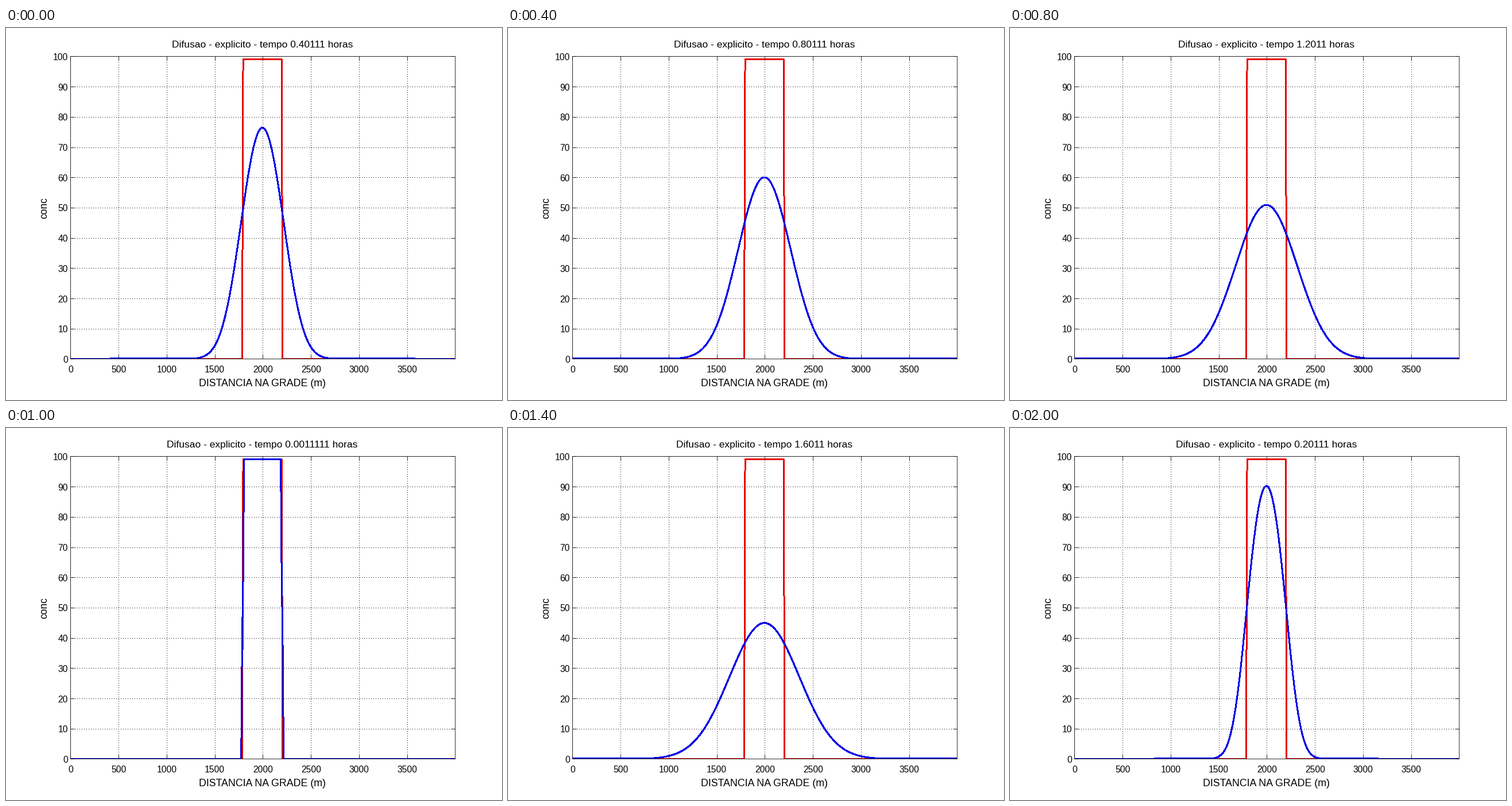
Animation of 864x648 px, one loop 2.2 s. Source, as a matplotlib script:

```python
import numpy as np
import matplotlib.pyplot as plt
from matplotlib.animation import FuncAnimation

W, H = 864, 648
# just under half a pixel, so snapped lines do not round up
LEFT, RIGHT, TOP, BOTTOM = 112.49, 782.49, 49.49, 576.49
X_MAX = 4000

# explicit diffusion: D = 10 m2/s, dx = 10 m, dt = 4 s
CELLS, DT, R = 400, 4, 10 * 4 / 10**2
HOURS = [0.4, 0.6, 0.8, 1.0, 1.2, 0.0, 1.4, 1.6, 1.8, 2.0, 0.2]

plt.rcParams["font.family"] = "Liberation Sans"
fig = plt.figure(figsize=(W / 72, H / 72), dpi=72, facecolor="white")
ax = fig.add_axes([LEFT / W, 1 - BOTTOM / H,
                   (RIGHT - LEFT) / W, (BOTTOM - TOP) / H])


def label(x, y, text, size, ha="center", **kw):
    return fig.text(x / W, 1 - y / H, text, fontsize=size, ha=ha,
                    va="baseline", color="black", **kw)


def diffuse(start, steps):
    c = start.copy()
    for _ in range(steps):
        c[1:-1] += R * (c[2:] - 2 * c[1:-1] + c[:-2])
    return c


def style_axes():
    ax.set(xlim=(0, X_MAX), ylim=(0, 100),
           xticks=range(0, 3501, 500), yticks=range(0, 101, 10))
    ax.set_axisbelow(True)
    ax.tick_params(direction="in", length=7, width=0.8, top=True, right=True,
                   labelbottom=False, labelleft=False)
    ax.grid(color="black", linewidth=1, linestyle=(0.5, (1, 3)))
    for spine in ax.spines.values():
        spine.set_linewidth(0.8)
    for v in range(0, 3501, 500):
        label(LEFT + v / X_MAX * (RIGHT - LEFT), 599.5, str(v), 15.6)
    for v in range(0, 101, 10):
        y = BOTTOM - v / 100 * (BOTTOM - TOP)
        label(108, y + 6.5, str(v), 15.6, ha="right")
    label(446, 624, "DISTANCIA NA GRADE (m)", 17.8)
    label(71, 313.5, "conc", 17.5, rotation=90, rotation_mode="anchor")


style_axes()
title = label(446.5, 34, "", 17.4)

x = np.linspace(0, X_MAX, CELLS)
pulse = np.zeros(CELLS)
pulse[179:220] = 99
profiles = [diffuse(pulse, round(h * 3600 / DT) + 1) for h in HOURS]

ax.plot(x, pulse, color="#e60000", linewidth=2, antialiased=False, zorder=3)
curve, = ax.plot([], [], color="#0000e6", linewidth=2, antialiased=False,
                 zorder=4)


def update(i):
    c = profiles[i]
    # any non-zero value sits a touch above the base line
    curve.set_data(x, np.where(c > 1e-14, np.maximum(c, 0.1), c))
    title.set_text(f"Difusao - explicito - tempo {HOURS[i] + DT / 3600:.5g} horas")
    return curve, title


anim = FuncAnimation(fig, update, frames=len(HOURS), interval=200, repeat=True)
plt.show()
```
